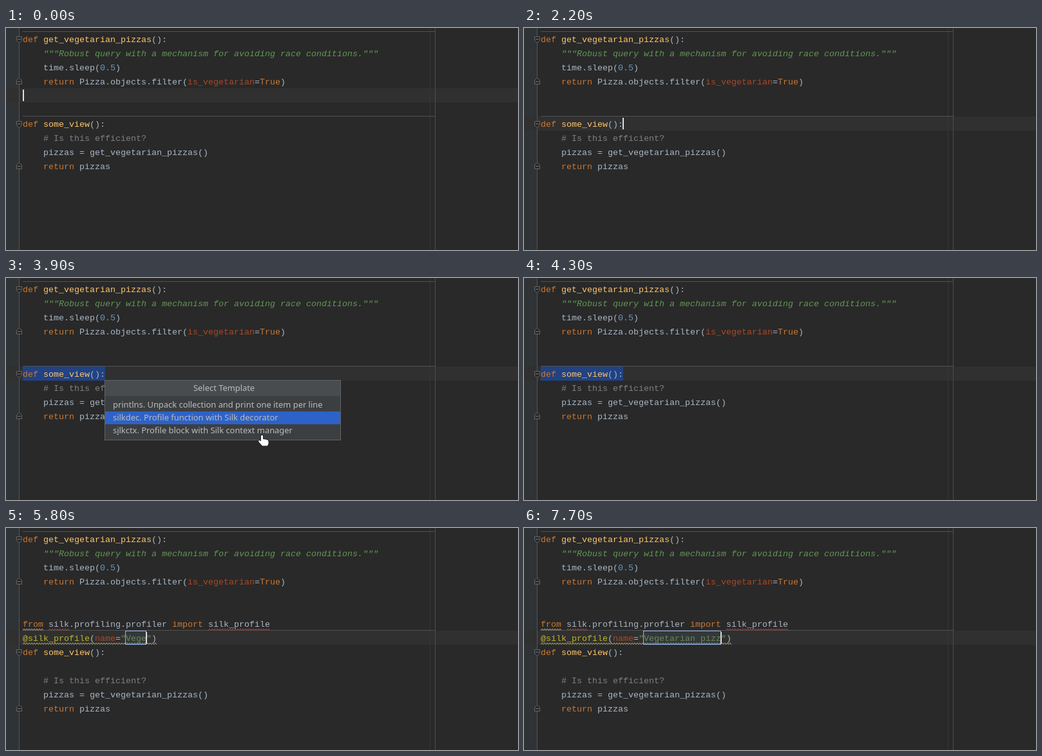
Recreate the animation shown at these times as an HTML page with a canvas. Size 795 by 346 pixels, loop 8000 ms.

```html
<!DOCTYPE html>
<html lang="en">
<head>
<meta charset="utf-8">
<title>Live template</title>
<style>
  html, body { margin: 0; width: 100%; height: 100%; overflow: hidden; background: #292929; }
  canvas { display: block; }
</style>
</head>
<body>
<canvas id="stage" width="795" height="346"></canvas>
<script>
const ctx = document.getElementById('stage').getContext('2d');
const LOOP = 8000, LEFT = 26, CHAR = 8, ROW = 22, MARGIN = 666;
const CODE_FONT = '13.33px "Liberation Mono", monospace';
const MENU_FONT = '12.9px "Noto Sans", sans-serif';
const BACK = '#292929', ACTIVE = '#303030';
const color = {
  text: '#a9b7c6', key: '#cc7832', fn: '#ffc66d', str: '#6a8759', doc: '#629755',
  num: '#6897bb', arg: '#aa4926', note: '#808080', deco: '#bbb529'
};

const header = [
  [['key', 'def '], ['fn', 'get_vegetarian_pizzas'], ['text', '():']],
  [['doc', '    """Robust query with a mechanism for avoiding race conditions."""']],
  [['text', '    time.sleep('], ['num', '0.5'], ['text', ')']],
  [['key', '    return '], ['text', 'Pizza.objects.filter('], ['arg', 'is_vegetarian'],
   ['text', '='], ['key', 'True'], ['text', ')']],
  [], []
];
const viewHead = [['key', 'def '], ['fn', 'some_view'], ['text', '():']];
const viewBody = [
  [['note', '    # Is this efficient?']],
  [['text', '    pizzas = get_vegetarian_pizzas()']],
  [['key', '    return '], ['text', 'pizzas']]
];
const importLine = [['key', 'from '], ['text', 'silk.profiling.profiler '],
  ['key', 'import '], ['text', 'silk_profile']];
const decorator = name => [['deco', '@silk_profile'], ['text', '('], ['arg', 'name'],
  ['text', '='], ['str', `"${name}"`], ['text', ')']];

// [label, index of the underlined letter]
const menu = [
  ['printlns. Unpack collection and print one item per line', 0],
  ['silkdec. Profile function with Silk decorator', 0],
  ['silkctx. Profile block with Silk context manager', 1]
];

// [time, number of typed characters]
const typing = [[5300, 1], [5600, 2], [5800, 4], [6100, 5], [6300, 6], [6500, 7], [6600, 8],
  [6700, 9], [6800, 10], [7100, 11], [7300, 12], [7400, 13], [7600, 14], [7700, 15]];
const typedCount = t => typing.reduce((n, [at, count]) => t >= at ? count : n, 0);

const rowTop = row => 6 + row * ROW;
const colX = col => LEFT + col * CHAR;

function rect(fill, x, y, w, h) {
  ctx.fillStyle = fill;
  ctx.fillRect(x, y, w, h);
}

function polyline(points, stroke, fill) {
  ctx.beginPath();
  points.forEach(([x, y]) => ctx.lineTo(x, y));
  if (fill) {
    ctx.closePath();
    ctx.fillStyle = fill;
    ctx.fill();
  }
  ctx.strokeStyle = stroke;
  ctx.lineWidth = 1;
  ctx.stroke();
}

function codeLine(tokens, row) {
  let col = 0;
  for (const [kind, text] of tokens) {
    ctx.font = (kind === 'doc' ? 'italic ' : '') + CODE_FONT;
    ctx.fillStyle = color[kind];
    ctx.fillText(text, colX(col), rowTop(row) + 16);
    col += text.length;
  }
}

function separator(row) {
  rect('#525252', LEFT, rowTop(row) - 1, MARGIN - LEFT, 1);
}

function foldMark(row, isEnd) {
  const base = rowTop(row) + (isEnd ? 15.5 : 7.5), dir = isEnd ? -1 : 1;
  polyline([[16.5, base], [24.5, base], [24.5, base + 6 * dir], [20.5, base + 10 * dir],
    [16.5, base + 6 * dir], [16.5, base]], '#666', BACK);
  rect('#777', 18, Math.floor(base + 4 * dir), 5, 1);
}

function squiggle(row, from, to, stroke) {
  const points = [], y = rowTop(row) + 19;
  for (let x = colX(from), i = 0; x <= colX(to); x += 2, i++) points.push([x, y + (i % 2 ? 0 : 2.5)]);
  polyline(points, stroke);
}

function caret(row, col) {
  rect('#ddd', Math.max(LEFT, colX(col) - 1), rowTop(row) + 2, 2, 18);
}

function background(activeRow) {
  rect(BACK, 0, 0, 795, 346);
  rect('#2f3335', 0, 0, 20, 346);
  rect(ACTIVE, 0, rowTop(activeRow), 795, ROW);
  rect('#555', 20, 0, 1, 346);
  rect('#353535', 658, 0, 1, 346);
  rect('#4d4d4d', MARGIN, 0, 1, 346);
}

function hand() {
  ctx.save();
  ctx.translate(391, 244);
  ctx.lineJoin = 'round';
  const shape = new Path2D('M5 2 Q6.5 0 8 2 V7 L14 8 Q16.5 8.5 16.5 11 V14 L15 17.5 H7 L1.5 11.5 Q.5 9.5 2.5 9 L5 10.5 Z');
  ctx.strokeStyle = '#222';
  ctx.lineWidth = 2;
  ctx.stroke(shape);
  ctx.fillStyle = '#fff';
  ctx.fill(shape);
  ctx.restore();
}

function popup(selected) {
  rect('#616365', 153, 159, 367, 94);
  rect('#3c3f41', 154, 160, 365, 92);
  rect('#484c4f', 154, 160, 365, 24);
  ctx.font = MENU_FONT;
  ctx.fillStyle = '#bbb';
  ctx.fillText('Select Template', 291, 176);
  menu.forEach(([label, mnemonic], i) => {
    const top = 188 + i * 20;
    if (i === selected) rect('#2d62c8', 154, top, 365, 20);
    ctx.fillStyle = '#bbb';
    ctx.fillText(label, 166, top + 14);
    if (selected === 0 || i === 2) {
      const x = 166 + ctx.measureText(label.slice(0, mnemonic)).width;
      rect('#bbb', Math.round(x), top + 15, Math.round(ctx.measureText(label[mnemonic]).width), 1);
    }
  });
  hand();
}

function templateField(count) {
  ctx.strokeStyle = '#8fb3ea';
  ctx.lineWidth = 1;
  if (count) ctx.strokeRect(185.5, 160.5, count * CHAR, 21);
  else ctx.strokeRect(184.5, 160.5, 3, 21);
}

function drawBefore(t) {
  background(t < 600 ? 4 : 6);
  if (t >= 2500) rect('#214283', LEFT, rowTop(6), 16 * CHAR, ROW);
  separator(0);
  separator(6);
  [...header, viewHead, ...viewBody].forEach(codeLine);
  foldMark(0);
  foldMark(3, true);
  foldMark(6);
  foldMark(9, true);
  if (t < 600) caret(4, 0);
  else if (t < 700) caret(6, 0);
  else if (t < 1500 || t >= 2200 && t < 2500) caret(6, 16);
  if (t >= 2500 && t < 4300) popup(t < 3900 ? 0 : 1);
}

function drawAfter(t) {
  const count = typedCount(t), analysed = t >= 4600;
  const name = 'Vegetarian pizz'.slice(0, count);
  background(7);
  rect('#33383b', colX(20), rowTop(7), count * CHAR, ROW);
  separator(0);
  separator(analysed ? 7 : 9);
  [...header, importLine, decorator(name), viewHead, [], ...viewBody].forEach(codeLine);
  foldMark(0);
  foldMark(3, true);
  foldMark(analysed ? 8 : 9);
  foldMark(12, true);
  if (analysed) {
    squiggle(6, 5, 9, '#bc3f3c');
    squiggle(6, 36, 48, '#bc3f3c');
  }
  if (t >= 4900) {
    squiggle(6, 0, 4, '#b3a978');
    squiggle(7, 0, 22 + count, '#b3a978');
  }
  templateField(count);
  caret(7, 20 + count);
}

function frame(now) {
  const t = now % LOOP;
  (t < 4400 ? drawBefore : drawAfter)(t);
  requestAnimationFrame(frame);
}
frame(0);
</script>
</body>
</html>
```
